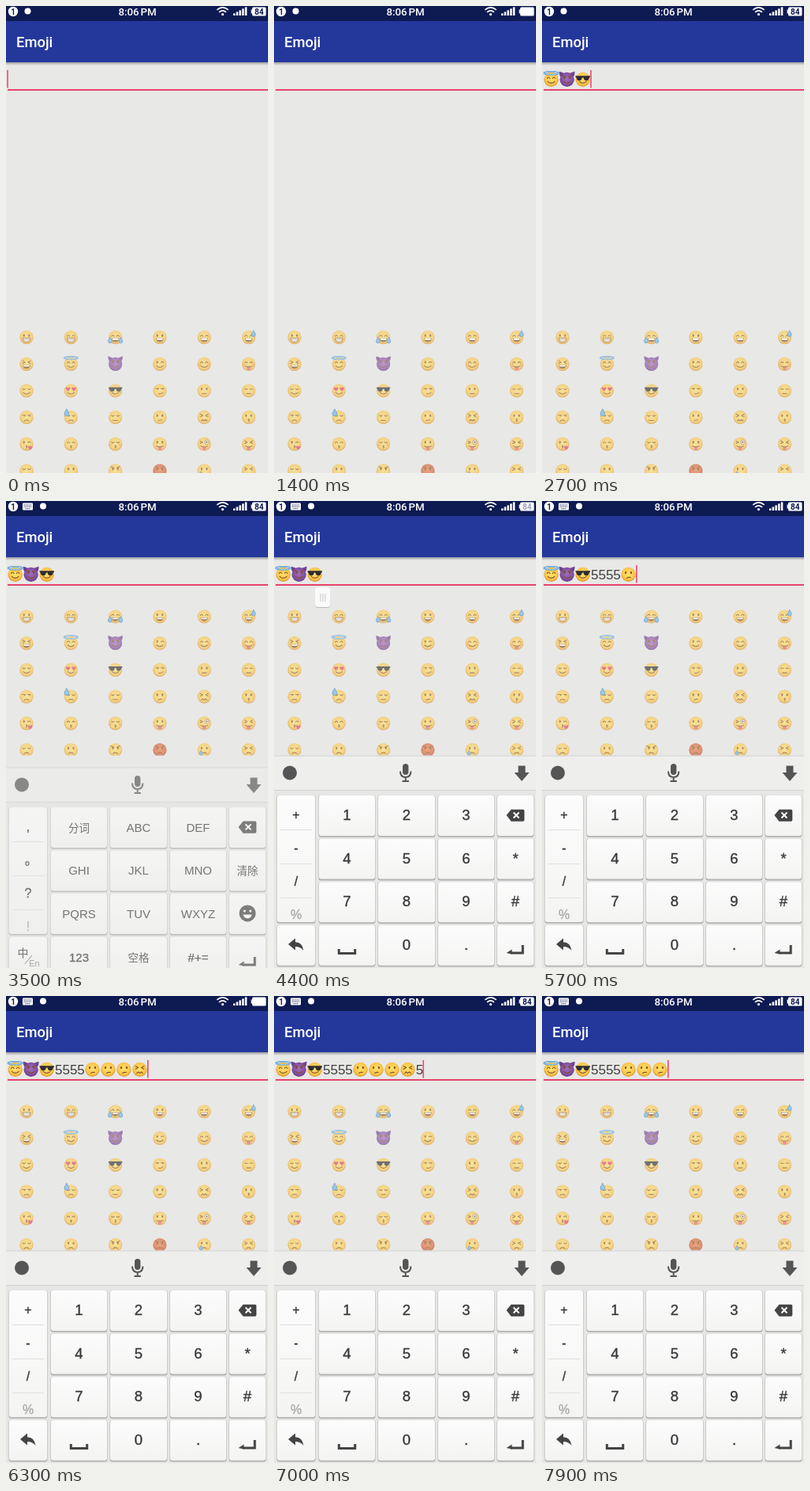
Write an HTML page that moves like this. It is 332 by 590 pixels and loops after 8000 ms.

```html
<!DOCTYPE html>
<html lang="en">
<head>
<meta charset="utf-8">
<title>Emoji</title>
<style>
html, body { margin: 0; width: 100%; height: 100%; overflow: hidden; background: #e8e8e6; }
svg { display: block; width: 332px; height: 590px; font-family: Roboto, sans-serif; }
.line { fill: none; stroke: #80511f; stroke-width: 1.05; stroke-linecap: round; stroke-linejoin: round; }
.eye { stroke-width: 2; }
.key { fill: url(#keyFill); }
.key.down { fill: #adaeb2; }
.label, .typed { font-family: "Liberation Sans", "Noto Sans CJK SC", "Noto Sans CJK", sans-serif; }
.label { text-anchor: middle; fill: #383838; }
.digit { stroke: #383838; stroke-width: .35; }
.icon { fill: #444; }
.stroke { fill: none; stroke: #444; stroke-width: 3; }
</style>
</head>
<body>
<svg id="stage" viewBox="0 0 332 590"></svg>
<script>
const LOOP = 8000;

// ---------- emoji faces, drawn around 0,0 with radius 9 ----------
const line = (d, extra = '') => `<path class="line" d="${d}" ${extra}/>`;
const shape = (d, fill, extra = '') => `<path d="${d}" fill="${fill}" ${extra}/>`;
const pair = d => line(d, 'transform="translate(-3.2 -1.8)"') + line(d, 'transform="translate(3.2 -1.8)"');
const heart = (x, y, s) => shape('M0 2.6C-4-.2-2.4-2.8 0-1.2C2.4-2.8 4-.2 0 2.6z', '#e0405a', `transform="translate(${x} ${y}) scale(${s})"`);
const drop = (x, y, s) => shape('M0-3.5C1 -1 2.4 0 2.4 1.6A2.4 2.4 0 0 1-2.4 1.6C-2.4 0-1-1 0-3.5z', '#6cb6ea',
  `stroke="#2f78b8" stroke-width=".7" transform="translate(${x} ${y}) scale(${s})"`);

const dots = pair('M0-.7v1.1').replaceAll('"line"', '"line eye"');
const squint = line('M-5-3.6l3.2 1.7-3.2 1.6M5-3.6l-3.2 1.7 3.2 1.6');

const EYES = {
  o: dots,
  n: pair('M-1.7 .8Q0-2 1.7 .8'),
  u: pair('M-1.7-.4Q0 1.7 1.7-.4'),
  l: pair('M-1.8 0h3.6'),
  s: pair('M-1.9-.6h3.8M.8-.2v.9'),
  x: squint,
  h: heart(-3.7, -2, 1.15) + heart(3.7, -2, 1.15),
  k: line('M-3.2-2.5v1.1').replace('"line"', '"line eye"') + line('M1.5-1.4Q3.2-3.4 5-1.6'),
  g: shape('M-8.7-4H8.7V-2.6L7.6-1.8Q7 1.6 4 1.6Q1.4 1.6 .8-2H-.8Q-1.4 1.6-4 1.6Q-7 1.6-7.6-1.8L-8.7-2.6z', '#2c2c31'),
  a: dots + line('M-5.6-4.8l3.8 1.8M5.6-4.8l-3.8 1.8'),
  p: line('M-5-3.2l3 1.4-3 1.3') + '<circle cx="3.2" cy="-2" r="2.7" fill="#fff" stroke="#80511f" stroke-width=".7"/><circle cx="3.2" cy="-2" r="1.1" fill="#5a3514"/>'
};

const MOUTHS = {
  D: shape('M-4.8 1.4H4.8Q4.4 6.3 0 6.3T-4.8 1.4z', '#86511f') + shape('M-4 1.8h8l-.5 1.8h-7z', '#fff'),
  T: shape('M-5 1.4H5Q4.6 6.2 0 6.2T-5 1.4z', '#fff', 'stroke="#80511f" stroke-width=".9"') + line('M-4.4 3.5H4.4', 'style="stroke-width:.5"'),
  U: line('M-4.2 2.6Q0 6.4 4.2 2.6'),
  v: line('M-1.5 4.2Q2.4 4.8 4 2.6'),
  '-': line('M-2.8 4h5.6'),
  '/': line('M-2 4.5Q.2 3.2 2.6 3.7'),
  f: line('M-3 4.9Q0 2.4 3 4.9'),
  w: line('M-3.6 4.8l1.8-1.7 1.8 1.7 1.8-1.7 1.8 1.7'),
  k: line('M-.4 2.2q2.4 .6 0 1.5q2.4 .8 0 1.8'),
  t: shape('M-2.3 3.8H2.3V5.8A2.3 2.1 0 0 1-2.3 5.8z', '#e8607a') + line('M-4.3 3Q0 4.8 4.3 3')
};

const EXTRAS = {
  j: drop(-6.8, 3.6, 1) + drop(6.8, 3.6, 1),
  d: drop(6.2, -4.8, 1.05),
  e: drop(-5.5, -6.2, 1.2),
  c: drop(-4, 3.6, .8),
  b: '<g fill="#ee8350" opacity=".5"><circle cx="-5.8" cy="1.4" r="1.6"/><circle cx="5.8" cy="1.4" r="1.6"/></g>',
  q: heart(4.8, 4.8, 1.2),
  H: '<ellipse cy="-7.4" rx="8.6" ry="1.8" fill="none" stroke="#3d86c6" stroke-width="1.7"/><ellipse cy="-7.4" rx="8.6" ry="1.8" fill="none" stroke="#b4dff8" stroke-width=".8"/>'
};
const HORNS = shape('M-9.3-9.4Q-5-8.4-2.6-6.6L-7.2-2.2Q-9.8-5.8-9.3-9.4zM9.3-9.4Q5-8.4 2.6-6.6L7.2-2.2Q9.8-5.8 9.3-9.4z', '#6f4190');

const SPECS = ('oT nT nDj oD nD nDd xD nUH aUV kU nUb ntb uU hU gU sv o- l- ' +
  'sf ufe u- o/ xw ok kkq nk ukb ot pt xt uf of af afR ofc xf').split(' ');

function face(spec, i) {
  const [eyes, mouth, extra = ''] = spec;
  const skin = { V: 'purple', R: 'red' }[extra] || 'yellow';
  const body = `<circle cy=".3" r="8.6" fill="url(#${skin})"/>` + EYES[eyes] + MOUTHS[mouth] + (EXTRAS[extra] || '');
  return `<g id="e${i}">${extra === 'V' ? HORNS : ''}${body}</g>`;
}

const skinFill = (id, ...stops) => `<radialGradient id="${id}" cy=".45" r=".56">` +
  stops.map((c, i) => `<stop offset="${[0, .72, 1][i]}" stop-color="${c}"/>`).join('') + '</radialGradient>';
const vertical = (id, a, b) => `<linearGradient id="${id}" x2="0" y2="1"><stop stop-color="${a}"/><stop offset="1" stop-color="${b}"/></linearGradient>`;

const defs = `<defs>
  ${skinFill('yellow', '#ffe070', '#fcc84a', '#d68422')}
  ${skinFill('purple', '#a06cbd', '#8450a5', '#5c327e')}
  ${skinFill('red', '#ea7d45', '#da6236', '#a93b20')}
  ${vertical('keyFill', '#fcfcfc', '#f4f4f3')}
  ${vertical('barShadow', '#9b9b9e', '#e8e8e6')}
  <clipPath id="gridClip"><rect id="gridView" width="332" height="590"/></clipPath>
  ${SPECS.map(face).join('')}
</defs>`;

const grid = `<g clip-path="url(#gridClip)"><g id="grid" opacity=".64">${SPECS.map((s, i) =>
  `<use href="#e${i}" x="${26 + i % 6 * 56.3}" y="${418.3 + Math.floor(i / 6) * 33.7}"/>`).join('')}</g></g>`;

// ---------- app and status bar ----------
const bars = `
  <rect y="71" width="332" height="4" fill="url(#barShadow)"/>
  <rect width="332" height="71" fill="#24389c"/>
  <rect width="332" height="19" fill="#0e1a52"/>
  <text x="13" y="52" font-size="18.4" font-weight="500" fill="#fff">Emoji</text>
  <g fill="#fff">
    <circle cx="9" cy="7" r="6.2"/>
    <text x="9" y="10.6" font-size="10" font-weight="700" text-anchor="middle" style="fill:#0e1a52">1</text>
    <g id="kbIcon"><rect x="21" y="2.5" width="13" height="9" rx="1"/>
      <path d="M22.5 5h10M22.5 7.2h10M24.5 9.6h6" stroke="#0e1a52" stroke-dasharray="1.2 .9"/></g>
    <circle id="dot" cx="27.5" cy="6.5" r="4"/>
    <text x="166.5" y="12" font-size="13.3" font-weight="500" text-anchor="middle" word-spacing="-1.6">8:06 PM</text>
    <circle cx="274.5" cy="10.6" r="1.6"/>
    <path d="M267.3 4.8Q274.5-1 281.7 4.8M270 7.8Q274.5 4 279 7.8" fill="none" stroke="#fff" stroke-width="1.7"/>
    ${[0, 1, 2, 3, 4].map(i => `<rect x="${288 + i * 3.7}" y="${9.4 - i * 2}" width="2.5" height="${2.6 + i * 2}"/>`).join('')}
    <rect x="310.6" y="4.5" width="3" height="5"/>
    <rect x="312" y="1.5" width="17.5" height="11" rx="1.5"/>
    <text id="charge" x="320.8" y="10.7" font-size="10" font-weight="700" text-anchor="middle" style="fill:#0e1a52">84</text>
  </g>`;

// ---------- text field ----------
const TOKENS = [
  [7, 2300], [8, 2600], [14, 2700],
  ['5', 5000], ['5', 5100], ['5', 5200], ['5', 5300],
  [21, 5500], [21, 5800], [21, 6000], [22, 6200, 7700], ['5', 6800, 7400]
];
const carets = [2];
let x = 2;
const tokens = TOKENS.map(([v], i) => {
  const isText = typeof v === 'string', left = x;
  x += isText ? 9.45 : 20;
  carets.push(x);
  return isText
    ? `<text id="t${i}" class="typed" x="${left}" y="99" font-size="17" fill="#404040">${v}</text>`
    : `<use id="t${i}" href="#e${v}" transform="translate(${left + 9.7} 92.6) scale(1.06)"/>`;
}).join('');
const field = `<rect x="2" y="105" width="330" height="2" fill="#e8436f"/>${tokens}
  <rect id="caret" y="81" width="1.6" height="22.5" fill="#ec4a73"/>
  <g id="handle"><rect x="52" y="110.5" width="19.5" height="24.5" rx="4" fill="#bdbdbd"/>
    <rect x="52" y="109" width="19.5" height="25" rx="4" fill="#fafafa"/>
    <path d="M59 117v10M62 117v10M65 117v10" stroke="#cfcfcf" stroke-width="1.2"/></g>`;

// ---------- keyboard ----------
const COLS = [[4, 48], [57, 71], [132, 72], [208, 71], [283, 46]];
const rowTop = r => 372 + r * 54.6;
const mid = c => COLS[c][0] + COLS[c][1] / 2;
const text = (s, x, y, size, extra = '') => `<text class="label" x="${x}" y="${y}" font-size="${size}" ${extra}>${s}</text>`;

function keyBox(c, r, h = 51, id = '') {
  const [x, w] = COLS[c], y = rowTop(r);
  return `<rect x="${x - .5}" y="${y}" width="${w + 1}" height="${h + 1.8}" rx="3" fill="#b4b4b3"/>
    <rect ${id && `id="${id}"`} class="key" x="${x}" y="${y}" width="${w}" height="${h}" rx="3"/>`;
}

const backspace = `<path class="icon" d="M294.5 397l6-7.3H315.5a1.8 1.8 0 0 1 1.8 1.8V403a1.8 1.8 0 0 1-1.8 1.8H300.5z"/>
  <path d="M303.5 393.5l7 7M310.5 393.5l-7 7" stroke="#fff" stroke-width="2"/>`;
const enter = `<path class="stroke" d="M315.2 561v10H300"/><path class="icon" d="M294.5 571l7-4.4v6z"/>`;

function pad(id, labels, size, side, extras) {
  let out = keyBox(0, 0, 160) + '<path d="M8 415.5h40M8 458.5h40M8 501.5h40" stroke="#dededd"/>' + keyBox(0, 3);
  labels.forEach((row, r) => row.forEach((s, c) => {
    const han = /[^\x00-\x7f]/.test(s);
    out += keyBox(c + 1, r, 51, `${id}${r}${c + 1}`);
    if (s) out += `<g class="${/^[0-9#*.]/.test(s) ? 'digit' : ''}">${text(s, mid(c + 1), rowTop(r) + 31, han ? 13.5 : size)}</g>`;
  }));
  side.forEach((s, i) => out += `<g class="digit">${text(s, 28, 402 + i * 42, 16, i > 2 ? 'opacity=".4"' : '')}</g>`);
  return `<g id="${id}">${out}${backspace}${enter}${extras}</g>`;
}

const letters = pad('abc', [
  ['分词', 'ABC', 'DEF', ''], ['GHI', 'JKL', 'MNO', '清除'],
  ['PQRS', 'TUV', 'WXYZ', ''], ['123', '空格', '#+=', '']
], 15, [',', '｡', '?', '!'], `
  ${text('中', 21.5, 561, 14)}${text('En', 36, 573, 11, 'opacity=".6"')}
  <path d="M24 570l9-11" stroke="#666"/>
  <circle class="icon" cx="306" cy="506" r="10.5"/>
  <circle cx="302.3" cy="503" r="1.5" fill="#fff"/><circle cx="309.7" cy="503" r="1.5" fill="#fff"/>
  <path d="M300.5 507.5h11Q310.5 512.3 306 512.3T300.5 507.5z" fill="#fff"/>`);

const digits = pad('num', [
  ['1', '2', '3', ''], ['4', '5', '6', '*'], ['7', '8', '9', '#'], ['', '0', '.', '']
], 18.5, ['+', '-', '/', '%'], `
  <path class="stroke" d="M82.3 566v5.5h20.4v-5.5"/>
  <path class="icon" d="M18 560l9-7.5v4.8q9 .2 10.5 10.7Q33.5 563 27 563v4.6z"/>`);

const keyboard = `<g id="keyboard">
  <rect y="322" width="332" height="330" fill="#e6e6e5"/>
  <rect y="322" width="332" height="43" fill="#eeeeed"/>
  <path d="M0 322h332M0 365.5h332" stroke="#d2d2d1"/>
  <circle cx="20" cy="343.5" r="9" fill="#555"/>
  <rect x="163" y="332" width="7.4" height="14" rx="3.7" fill="#555"/>
  <path d="M160 341.5q0 7.5 6.7 7.5t6.7-7.5M166.7 349v5M162.5 354h8.4" fill="none" stroke="#555" stroke-width="2"/>
  <path d="M309.5 334.5h9v8.5h5L314 354l-9.5-11h5z" fill="#555"/>
  ${letters}${digits}</g>`;

document.getElementById('stage').innerHTML =
  defs + '<rect width="332" height="590" fill="#e8e8e6"/>' + grid + bars + field + keyboard;

// ---------- timeline ----------
const $ = id => document.getElementById(id);
const within = (t, spans) => spans.some(([a, b]) => t >= a && t < b);
const show = (id, on) => { $(id).style.display = on ? '' : 'none'; };
const ramp = (t, a, b) => Math.min(1, Math.max(0, (t - a) / (b - a)));

const CARET_OFF = [[1400, 1900], [3200, 3600], [4100, 4600]];
const PRESSES = {
  abc31: [[4100, 4200]],
  num12: [[5000, 5300], [6600, 7000]],
  num04: [[7400, 7600], [7700, 7900]]
};
const FADES = [[1000, 1400, 1900, 2400], [3500, 3900, 4200, 4700], [5700, 6100, 6500, 7000]];

function draw(now) {
  const t = Math.floor(now % LOOP / 100) * 100;
  const open = t >= 3400, numeric = t >= 4200;

  let count = 0;
  TOKENS.forEach(([, from, to = LOOP], i) => {
    const on = t >= from && t < to;
    show('t' + i, on);
    if (on) count = i + 1;
  });
  $('caret').setAttribute('x', carets[count] - .8);
  show('caret', !within(t, CARET_OFF));
  show('handle', within(t, [[3700, 5000]]));

  show('kbIcon', open);
  $('dot').setAttribute('cx', open ? 47 : 27.5);
  $('charge').setAttribute('opacity', FADES.reduce((o, [a, b, c, d]) => o - ramp(t, a, b) + ramp(t, c, d), 1));

  $('grid').setAttribute('transform', `translate(0 ${open ? -272.6 : 0})`);
  $('gridView').setAttribute('height', open ? 321.5 : 590);

  // the keyboard rises and fades in, easing out
  const late = 1 - ramp(t, 3400, 3800);
  show('keyboard', open);
  $('keyboard').setAttribute('transform', `translate(0 ${(47 * late ** 4).toFixed(1)})`);
  $('keyboard').setAttribute('opacity', 1 - .6 * late ** 1.9);
  show('abc', !numeric);
  show('num', numeric);
  for (const id in PRESSES) $(id).classList.toggle('down', within(t, PRESSES[id]));

  requestAnimationFrame(() => draw(performance.now()));
}
draw(performance.now());
</script>
</body>
</html>
```
